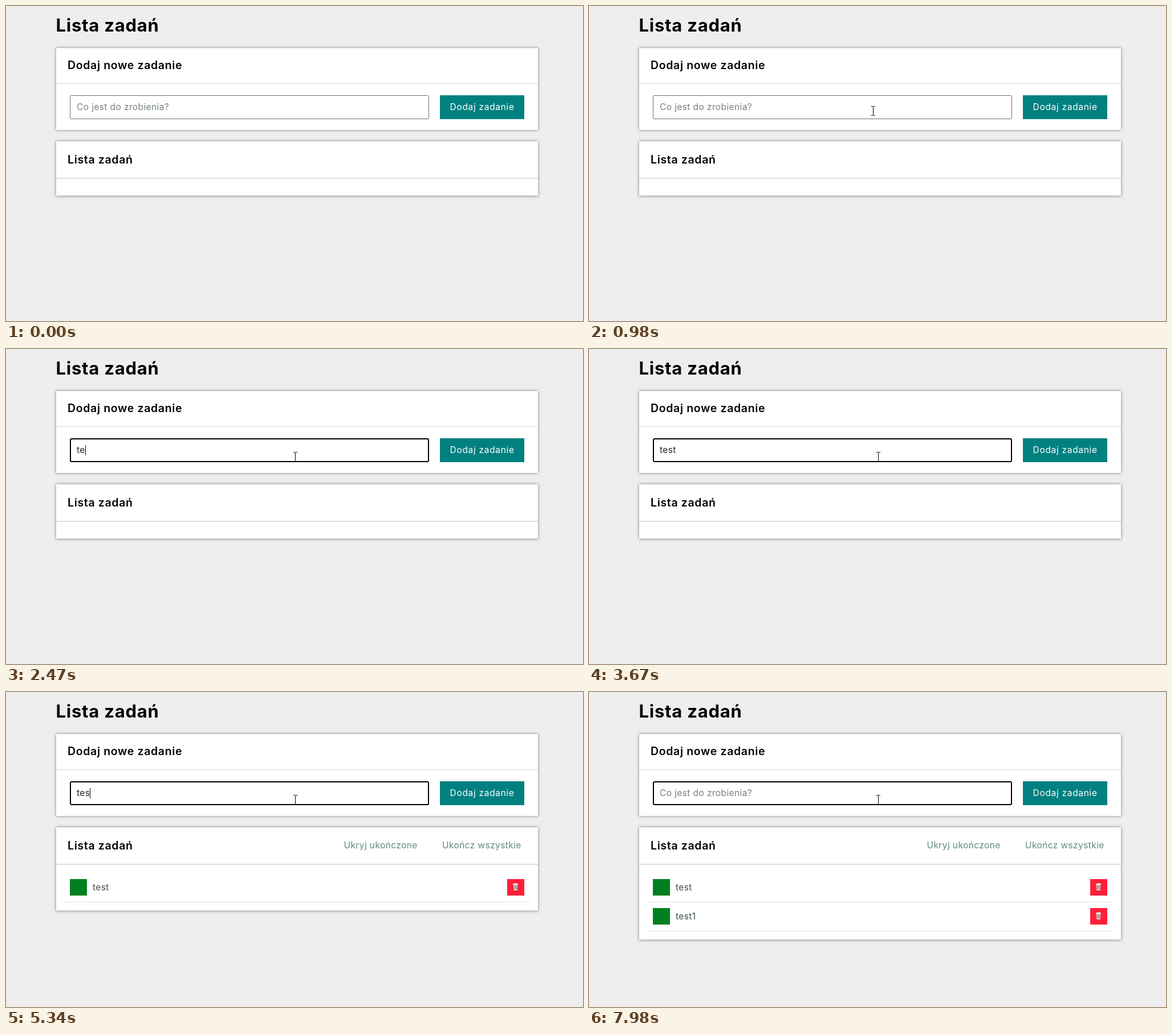
Recreate the animation shown at these times as an HTML page with a canvas. Size 1012 px wide and 554 px high, loop 8000 ms.

```html
<!DOCTYPE html>
<html lang="pl">
<head>
<meta charset="utf-8">
<title>Lista zadań</title>
<style>
  html, body { margin: 0; width: 100%; height: 100%; overflow: hidden; background: #eee; }
  canvas { display: block; }
</style>
</head>
<body>
<canvas id="stage" width="1012" height="554"></canvas>
<script>
const ctx = document.getElementById('stage').getContext('2d');
const LOOP = 8000;
const FOCUS = 1040;
const ADDED = [{ at: 3870, name: 'test' }, { at: 7700, name: 'test1' }];

// Input states: start time, typed text, caret visible
const INPUT = [
  [0, '', false], [FOCUS, '', true], [1580, '', false], [2110, '', true],
  [2250, 't', true], [2470, 'te', true], [2790, 'tes', true],
  [3130, 'test', true], [3670, 'test', false], [3870, '', false],
  [4200, '', true], [4740, '', false], [4820, 't', true],
  [5140, 'te', true], [5340, 'tes', true], [5900, 'tes', false],
  [6020, 'test', true], [6360, 'test1', true], [6960, 'test1', false],
  [7500, 'test1', true], [7700, '', true], [7980, '', false]
];

const BODY = { size: 15.5, weight: 400, gap: 0.4 };
const LABEL = { size: 15.5, weight: 400, gap: 0.7 };
const H1 = { size: 31, weight: 700, gap: 0.75 };
const H2 = { size: 19.5, weight: 600, gap: 0.65 };

function setFont({ size, weight, gap }) {
  ctx.font = `${weight} ${size}px Inter, sans-serif`;
  ctx.letterSpacing = gap + 'px';
}

function text(str, x, y, style, color) {
  setFont(style);
  ctx.fillStyle = color;
  ctx.fillText(str, x, y);
}

function rect(x, y, w, h, color) {
  ctx.fillStyle = color;
  ctx.fillRect(x, y, w, h);
}

function card(y, h) {
  ctx.save();
  ctx.shadowColor = '#777';
  ctx.shadowBlur = 5;
  rect(88, y, 845, h, '#fff');
  ctx.restore();
}

function inputBox(t) {
  const focused = t >= FOCUS;
  const inset = focused ? 1 : 0.5;
  ctx.beginPath();
  ctx.roundRect(112 + inset, 157 + inset, 630 - 2 * inset, 42 - 2 * inset, 2);
  ctx.lineWidth = 2 * inset;
  ctx.strokeStyle = focused ? '#000' : '#6b6b6b';
  ctx.stroke();

  const [, typed, caret] = INPUT.findLast(([at]) => t >= at);
  if (typed) text(typed, 124, 183, BODY, '#262626');
  else text('Co jest do zrobienia?', 124, 183, BODY, '#75807b');
  if (caret) {
    setFont(BODY);
    rect(124 + Math.round(ctx.measureText(typed).width), 169, 1, 18, '#000');
  }
}

function trash(x, y) {
  rect(x + 3, y, 3, 1, '#d8d0cc');
  rect(x, y + 1, 9, 2, '#eee8e4');
  ctx.beginPath();
  ctx.moveTo(x + 0.7, y + 3);
  ctx.lineTo(x + 8.3, y + 3);
  ctx.lineTo(x + 7.6, y + 13);
  ctx.lineTo(x + 1.4, y + 13);
  ctx.fillStyle = '#d9d2ce';
  ctx.fill();
  for (let i = 0; i < 3; i++) rect(x + 2 + i * 2, y + 4, 1, 7, '#8c7873');
}

function task(name, i) {
  const y = 329 + i * 51;
  rect(112, y, 30, 29, '#008020');
  text(name, 152, y + 19.5, BODY, '#3c4f40');
  rect(879, y, 30, 29, '#ff2039');
  trash(889, y + 7);
  rect(102, y + 40, 817, 1, '#dedede');
}

function arrow(x, y) {
  const shape = [[0, 0], [0, 16], [3.7, 12.5], [6, 18], [8.7, 17], [6.4, 11.6], [11, 11.4]];
  ctx.beginPath();
  shape.forEach(([dx, dy]) => ctx.lineTo(x + 0.5 + dx, y + 0.5 + dy));
  ctx.closePath();
  ctx.fillStyle = '#fff';
  ctx.fill();
  ctx.lineWidth = 1;
  ctx.strokeStyle = '#111';
  ctx.stroke();
}

function beam(x, y) {
  rect(x, y - 7, 1, 15, '#000');
  for (const end of [y - 8, y + 8]) {
    rect(x - 3, end, 3, 1, '#000');
    rect(x + 1, end, 3, 1, '#000');
  }
}

function pointer(t) {
  if (t < 100) return;
  if (t < 780) {
    const step = Math.min(9, Math.floor((t - 100) / 68.8));
    const left = (1 - step / 9) ** 2;
    arrow(Math.round(513 + 334 * left), Math.round(202 + 321 * left));
  } else if (t < 840) beam(507, 193);
  else if (t < 920) beam(502, 187);
  else if (t < 1180) beam(498, 184);
  else beam(507, 189);
}

function draw(t) {
  const tasks = ADDED.filter(({ at }) => t >= at);
  rect(0, 0, 1012, 554, '#eee');
  text('Lista zadań', 87.5, 44.5, H1, '#000');

  card(74, 144);
  text('Dodaj nowe zadanie', 108, 111, H2, '#000');
  rect(88, 136, 845, 1, '#e2d3d8');
  inputBox(t);
  rect(761, 157, 148, 42, '#008080');
  text('Dodaj zadanie', 778.5, 183, LABEL, '#fff');

  card(238, 95.5 + tasks.length * 51);
  text('Lista zadań', 108, 276.5, H2, '#000');
  rect(88, 302.5, 845, 1.2, '#dcc2ca');
  if (tasks.length) {
    text('Ukryj ukończone', 592.5, 274.5, BODY, '#5c8b7b');
    text('Ukończ wszystkie', 765, 274.5, BODY, '#5c8b7b');
  }
  tasks.forEach(({ name }, i) => task(name, i));
  pointer(t);
}

const start = performance.now();
function tick() {
  draw((performance.now() - start) % LOOP);
  requestAnimationFrame(tick);
}
tick();
</script>
</body>
</html>
```
